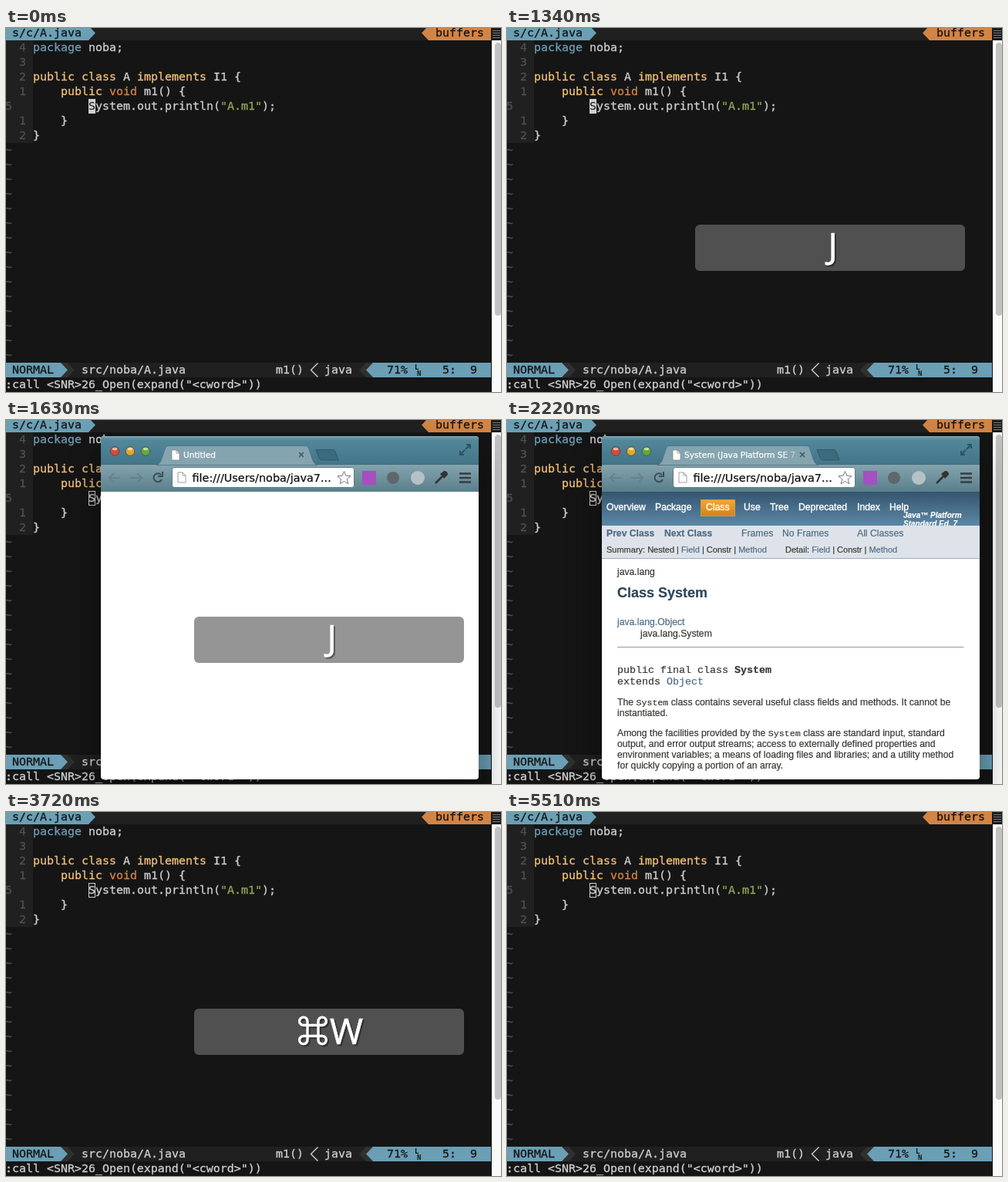
Write an HTML page that moves like this. It is 642x472 px and loops after 6.46 s.

```html
<!DOCTYPE html>
<html lang="en">
<head>
<meta charset="utf-8">
<title>Editor and documentation lookup</title>
<style>
  html, body { margin: 0; width: 100%; height: 100%; overflow: hidden; background: #151515; }
  svg { display: block; width: 642px; height: 472px; }
  text { white-space: pre; }
  .mono { font: 14.95px "DejaVu Sans Mono", monospace; stroke-width: .3; }
  .ui { font-family: "DejaVu Sans", sans-serif; stroke-width: .25; }
  .doc { font: 12.2px "Liberation Sans", Arial, sans-serif; stroke-width: .2; }
  .code { font-family: "Liberation Mono", monospace; }
  .key { font: 46.5px "Open Sans", sans-serif; fill: #fff; stroke: #fff; stroke-width: .7;
         filter: drop-shadow(2px 2px 0 rgba(0,0,0,.4)); }
  .key use { fill: none; stroke-width: 3.4; }
  .b { font-weight: bold; }
  .link { fill: #4c6b87; stroke: #4c6b87; }
</style>
</head>
<body>
<svg viewBox="0 0 642 472">
  <defs>
    <linearGradient id="strip" x2="0" y2="1">
      <stop stop-color="#6d9dac"/><stop offset=".15" stop-color="#528699"/><stop offset="1" stop-color="#437589"/>
    </linearGradient>
    <linearGradient id="bar" x2="0" y2="1">
      <stop stop-color="#84a4af"/><stop offset="1" stop-color="#597f8b"/>
    </linearGradient>
    <linearGradient id="nav" x2="0" y2="1">
      <stop stop-color="#35556f"/><stop offset="1" stop-color="#5c88a6"/>
    </linearGradient>
    <linearGradient id="current" x2="0" y2="1">
      <stop stop-color="#f6a636"/><stop offset="1" stop-color="#d58213"/>
    </linearGradient>
    <linearGradient id="fade" gradientUnits="userSpaceOnUse" x1="355" x2="375">
      <stop stop-color="#fff"/><stop offset="1" stop-color="#fff" stop-opacity=".25"/>
    </linearGradient>
    <clipPath id="frame"><rect x="123" y="21" width="490" height="445" rx="4"/></clipPath>
    <clipPath id="navClip"><rect x="123" y="93" width="490" height="44"/></clipPath>
    <path id="loop" d="M-7 -7H7V-12A5.200 5.200 0 1 1 12 -7H7"/>
    <g id="command">
      <use href="#loop"/><use href="#loop" transform="rotate(90)"/>
      <use href="#loop" transform="rotate(180)"/><use href="#loop" transform="rotate(270)"/>
    </g>
    <g id="page">
      <path d="M0 0H6L10 4V13H0Z" fill="#fff" stroke="#888" stroke-width=".8"/>
      <path d="M6 0V4H10" fill="none" stroke="#888" stroke-width=".8"/>
    </g>
  </defs>

  <rect width="642" height="472" fill="#151515"/>
  <g id="terminal" class="mono"></g>

  <g id="scrollbar">
    <rect x="630" width="12" height="472" fill="#fafafa"/>
    <rect x="630" width="12" height="16" fill="#1c1c1c"/>
    <path d="M631 3.5H641M631 6.5H641M631 9.5H641M631 12.5H641" stroke="#777"/>
    <rect x="634" y="19" width="8" height="354" rx="4" fill="#c1c1c1"/>
  </g>

  <g id="solid">
    <rect x="107" y="92" width="9" height="19" fill="#d0d0d0"/>
    <text class="mono" x="107" y="106" fill="#151515">S</text>
  </g>
  <rect id="hollow" x="107.5" y="92.5" width="8" height="18" fill="none" stroke="#d0d0d0"/>
  <text id="pending" class="mono" x="530" y="467" fill="#d0d0d0">,</text>

  <g id="window">
    <rect x="123" y="47" width="490" height="444" style="filter:blur(22px)" opacity=".45"/>
    <g clip-path="url(#frame)">
      <rect x="123" y="21" width="490" height="445" fill="#fff"/>
      <rect x="123" y="21" width="490" height="37" fill="url(#strip)"/>
      <path d="M123 21.500H613" stroke="#8db3bf"/>
      <rect x="123" y="58" width="490" height="35" fill="url(#bar)"/>
      <path d="M123 57.500H613" stroke="#3f6a79"/>
      <path d="M195 58.500Q200 57 202 50L206 38Q207 33.500 211 33.500H388Q392 33.500 393 38L397 50Q399 57 404 58.500Z" fill="#84a4af" stroke="#4b707d" stroke-width=".8"/>
      <path d="M402 38.500H424Q426 38.500 427 41L431 52H410Q407 52 406 49Z" fill="#3b6b7e" stroke="#2f5969"/>
      <g id="lights"></g>
      <use href="#page" x="215" y="39"/>
      <path d="M380 42L386 48M386 42L380 48" stroke="#405660" stroke-width="1.500"/>
      <path d="M596 38L602 32M597 32H602V37M595 39L589 45M589 40V45H594" fill="none" stroke="#2c5261" stroke-width="2"/>
      <g fill="none" stroke="#66828c" stroke-width="2.200">
        <path d="M148 75H135M140 69L134 75L140 81"/>
        <path d="M161 75H175M170 69L176 75L170 81"/>
      </g>
      <path d="M201 71A5.500 5.500 0 1 0 202 77M203 67V73H197" fill="none" stroke="#3e4c52" stroke-width="2"/>
      <rect x="215.500" y="61.500" width="236" height="26" rx="3" fill="#fff" stroke="#5d7c87"/>
      <use href="#page" x="223" y="68"/>
      <text class="ui" x="241.500" y="80" font-size="14.400" fill="#111" stroke="#111">file:///Users/noba/java7...</text>
      <path id="star" fill="#fff" stroke="#777"/>
      <rect x="462" y="66" width="18" height="18" fill="#a64fc0"/>
      <circle cx="502" cy="75" r="8" fill="#5d686c"/>
      <circle cx="534" cy="75" r="9" fill="#b5c1c4"/>
      <path d="M557 82L566 73" stroke="#333" stroke-width="2.500"/>
      <path d="M563 70L568 66Q573 66 573 71L568 76Z" fill="#333"/>
      <path d="M588 69.500H603M588 75H603M588 80.500H603" stroke="#333d41" stroke-width="2.500"/>
      <text id="blankTitle" class="ui" x="230" y="49" font-size="10.600" fill="#fff" stroke="#fff">Untitled</text>
      <g id="docs">
        <text class="ui" x="230" y="49" font-size="10.600" fill="url(#fade)" stroke="url(#fade)">System (Java Platform SE 7</text>
        <rect x="123" y="93" width="490" height="44" fill="url(#nav)"/>
        <rect x="251.500" y="103.500" width="44" height="21" fill="url(#current)" stroke="#c9a044"/>
        <rect x="123" y="137" width="490" height="43" fill="#dee3e9"/>
        <path d="M123 179.500H613" stroke="#9eadc0"/>
        <path d="M143 294.500H592.500" stroke="#999"/>
        <g id="copy" class="doc" fill="#353833" stroke="#353833"></g>
        <g clip-path="url(#navClip)" class="doc b" fill="#fff" stroke="#fff" style="font-size:10px;font-style:italic">
          <text x="514" y="127">Java™ Platform</text>
          <text x="514" y="138">Standard Ed. 7</text>
        </g>
      </g>
    </g>
  </g>

  <rect id="panel" x="244" y="255" width="350" height="60" rx="6" fill="#696969" fill-opacity=".705"/>
  <g id="keyComma" class="key"><text x="412" y="300">,</text></g>
  <g id="keyJ" class="key"><text x="416.500" y="299">J</text></g>
  <g id="keyCmd" class="key"><use href="#command" x="418.500" y="283.500"/></g>
  <g id="keyCmdW" class="key"><use href="#command" x="398" y="283.500"/><text x="420" y="301">W</text></g>
  <path id="pointer" d="M626 173Q630 173 630 176Q630 173 634 173M630 176V189M626 192Q630 192 630 189Q630 192 634 192" fill="none" stroke="#888" stroke-width="1.500"/>
</svg>

<script>
const LOOP = 6460;
const CELL = 9, ROW = 19;
const FG = '#d0d0d0', BG = '#151515', BAR = '#202020', EDGE = '#303030', DIM = '#505050';
const BLUE = '#6a9fb5', ORANGE = '#d28445', YELLOW = '#f4bf75', GREEN = '#90a959';

const $ = id => document.getElementById(id);
function add(parent, tag, attrs, content = '') {
  const node = document.createElementNS('http://www.w3.org/2000/svg', tag);
  for (const name in attrs) node.setAttribute(name, attrs[name]);
  node.innerHTML = content;
  parent.append(node);
  return node;
}

// Terminal, laid out on a character grid
const terminal = $('terminal');
const colX = col => col * CELL - 1;
const rowY = row => row * ROW - 3;
const esc = s => s.replace(/</g, '&lt;');
const put = (col, row, text, fill = FG) =>
  add(terminal, 'text', { x: colX(col), y: rowY(row) + 14, fill, stroke: fill }, esc(text));
const fillCells = (from, to, row, fill) =>
  add(terminal, 'rect', { x: colX(from), y: rowY(row), width: (to - from) * CELL, height: ROW, fill });
function arrow(col, row, fill, dir) {
  const x = colX(dir > 0 ? col : col + 1), y = rowY(row);
  add(terminal, 'path', { d: `M${x} ${y}l${dir * CELL} ${ROW / 2}l${-dir * CELL} ${ROW / 2}z`, fill });
}

fillCells(0, 70, 0, BAR);
fillCells(0, 12, 0, BLUE);
arrow(12, 0, BLUE, 1);
put(1, 0, 's/c/A.java', BG);
arrow(60, 0, ORANGE, -1);
fillCells(61, 70, 0, ORANGE);
put(62, 0, 'buffers', BG);

add(terminal, 'rect', { x: 0, y: 16, width: 35, height: 133, fill: BAR });
['4', '3', '2', '1', '5', '1', '2'].forEach((n, i) => put(n === '5' ? 0 : 2, i + 1, n, DIM));
[
  [4, 1, 'package', BLUE], [12, 1, 'noba;'],
  [4, 3, 'public class', YELLOW], [17, 3, 'A'], [19, 3, 'implements', YELLOW], [30, 3, 'I1 {'],
  [8, 4, 'public', YELLOW], [15, 4, 'void', ORANGE], [20, 4, 'm1() {'],
  [12, 5, 'System.out.println('], [31, 5, '"A.m1"', GREEN], [37, 5, ');'],
  [8, 6, '}'], [4, 7, '}']
].forEach(run => put(...run));
for (let row = 8; row < 23; row++) put(0, row, '~', DIM);

fillCells(0, 70, 23, BAR);
fillCells(0, 8, 23, BLUE);
fillCells(8, 9, 23, EDGE);
arrow(8, 23, BLUE, 1);
arrow(9, 23, EDGE, 1);
put(1, 23, 'NORMAL', BG);
put(11, 23, 'src/noba/A.java');
put(39, 23, 'm1()');
add(terminal, 'path', {
  d: 'M404.5 434.5L395.5 443.5L404.5 452.5', fill: 'none', stroke: FG, style: 'stroke-width:1.4'
});
put(46, 23, 'java');
arrow(51, 23, EDGE, -1);
fillCells(52, 53, 23, EDGE);
arrow(52, 23, BLUE, -1);
fillCells(53, 70, 23, BLUE);
put(55, 23, '71%', BG);
[['L', 530, 443], ['N', 533, 451]].forEach(([c, x, y]) =>
  add(terminal, 'text', { x, y, fill: BG, style: 'font-size:9px;font-weight:bold' }, c));
put(63, 23, '5:', BG);
put(67, 23, '9', BG);
put(0, 24, ':call <SNR>26_Open(expand("<cword>"))');

// Browser chrome
['#d9493a', '#e3a52c', '#62ab35'].forEach((fill, i) => {
  const cx = 141 + i * 20;
  add($('lights'), 'circle', { cx, cy: 40.5, r: 5.8, fill, stroke: '#3b4d50', 'stroke-width': .8 });
  add($('lights'), 'ellipse', { cx, cy: 37.5, rx: 3.3, ry: 1.8, fill: '#fff', opacity: .6 });
});
const starPoint = (_, i) => {
  const r = i % 2 ? 4 : 9, a = i * Math.PI / 5;
  return `${438.5 + r * Math.sin(a)} ${75.5 - r * Math.cos(a)}`;
};
$('star').setAttribute('d', 'M' + Array.from({ length: 10 }, starPoint).join('L') + 'Z');

// Documentation page
const write = (x, y, html, attrs = {}) => add($('copy'), 'text', { x, y, ...attrs }, html);
const link = s => `<tspan class="link">${s}</tspan>`;
const name = '<tspan class="code" font-size="11.67">System</tspan>';
[['Overview', 129], ['Package', 192], ['Class', 258], ['Use', 307], ['Tree', 341],
 ['Deprecated', 378], ['Index', 454], ['Help', 496]]
  .forEach(([label, x]) => write(x, 117, label, { fill: '#fff', stroke: '#fff', style: 'stroke-width:.4' }));
write(129, 151, 'Prev Class', { class: 'link b' });
write(204, 151, 'Next Class', { class: 'link b' });
[['Frames', 304], ['No Frames', 357], ['All Classes', 454]]
  .forEach(([label, x]) => write(x, 151, link(label)));
const members = `${link('Field')} | Constr | ${link('Method')}`;
write(129, 172, `Summary: Nested | ${members}`, { style: 'font-size:11px' });
write(361, 172, `Detail: ${members}`, { style: 'font-size:11px' });
write(143, 201, 'java.lang');
write(143, 230, 'Class System', { class: 'b', style: 'font-size:18px', fill: '#2c4557', stroke: '#2c4557' });
write(143, 266, link('java.lang.Object'));
write(173, 281, 'java.lang.System');
const decl = { class: 'code', style: 'font-size:13.33px' };
write(143, 328, 'public final class <tspan class="b">System</tspan>', decl);
write(143, 343, `extends ${link('Object')}`, decl);
[
  [370, `The ${name} class contains several useful class fields and methods. It cannot be`],
  [384, 'instantiated.'],
  [410, `Among the facilities provided by the ${name} class are standard input, standard`],
  [424, 'output, and error output streams; access to externally defined properties and'],
  [438, 'environment variables; a means of loading files and libraries; and a utility method'],
  [452, 'for quickly copying a portion of an array.']
].forEach(([y, html]) => write(143, y, html));

// Timeline: each step holds its style until the next one
function hold(id, steps) {
  const frames = steps.map(([ms, style]) => ({ ...style, offset: ms / LOOP, easing: 'step-end' }));
  frames.push({ ...steps[steps.length - 1][1], offset: 1 });
  $(id).animate(frames, { duration: LOOP, iterations: Infinity }).startTime = 0;
}
function show(id, ...spans) {
  const steps = spans[0][0] > 0 ? [[0, { opacity: 0 }]] : [];
  for (const [from, to] of spans) {
    steps.push([from, { opacity: 1 }]);
    if (to < LOOP) steps.push([to, { opacity: 0 }]);
  }
  hold(id, steps);
}

show('solid', [0, 440], [740, 1480]);
show('hollow', [1480, LOOP]);
show('pending', [890, 1340]);
show('panel', [890, 2220], [3270, 4770]);
show('keyComma', [890, 1340]);
show('keyJ', [1340, 2220]);
show('keyCmd', [3270, 3720]);
show('keyCmdW', [3720, 4770]);
show('blankTitle', [0, 1770]);
show('docs', [1770, LOOP]);
show('pointer', [5360, 5510]);

const small = 'translate(82.4px, 74px) scale(.68)', full = 'translate(0px, 0px) scale(1)';
hold('window', [
  [0, { opacity: 0, transform: small }],
  [1480, { opacity: .6, transform: small }],
  [1630, { opacity: 1, transform: full }],
  [3720, { opacity: 0, transform: full }]
]);
</script>
</body>
</html>
```
